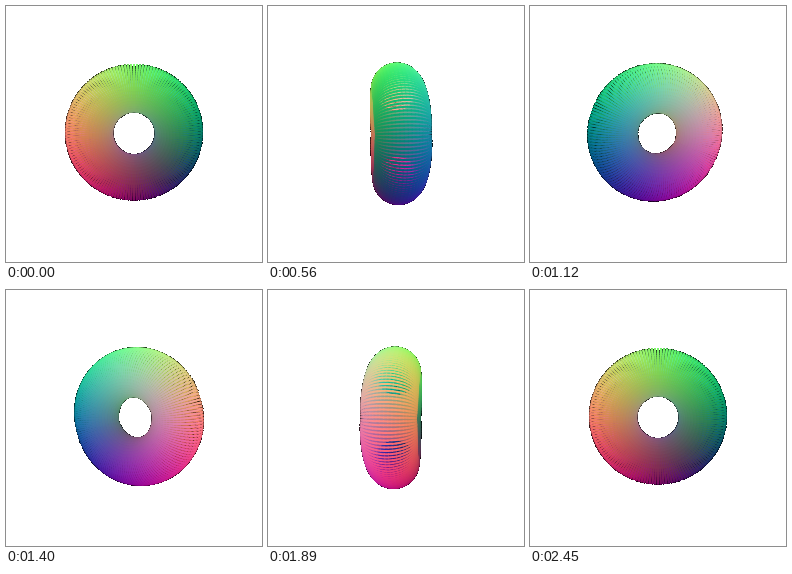
An HTML page with a canvas for the animation above (2.52 s loop, 256x256 px).

```html
<!DOCTYPE html>
<html lang="en">
<head>
<meta charset="utf-8">
<title>Rotating torus</title>
<style>
html, body { margin: 0; width: 100%; height: 100%; overflow: hidden; background: #fff; }
canvas { display: block; width: 256px; height: 256px; }
</style>
</head>
<body>
<canvas id="stage" width="256" height="256"></canvas>
<script>
const SIZE = 256, STEP = 70, STEPS = 36, TAU = Math.PI * 2;
const RING = 44.5, TUBE = 23.1, CAMERA = 250, PITCH = 0.125;
const LOOPS = 148, PARTS = 48, OVERLAP = 0.12, MIN_ALPHA = 40;

const ctx = document.getElementById('stage').getContext('2d', { willReadFrequently: true });
ctx.lineWidth = 2;

function torusPoint(loop, part) {
  const v = loop / LOOPS * TAU, u = part / PARTS * TAU;
  const radius = RING + TUBE * Math.cos(u);
  return [radius * Math.cos(v), radius * Math.sin(v), TUBE * Math.sin(u)];
}

// Each colour channel follows one body axis.
function colorAt([x, y, z]) {
  const channel = p => Math.round(127.5 + 127.5 * p / (RING + TUBE));
  return `rgb(${channel(-x)},${channel(y)},${channel(-z)})`;
}

const segments = [];
for (let loop = 0; loop < LOOPS; loop++) {
  for (let part = 0; part < PARTS; part++) {
    const middle = torusPoint(loop, part + 0.5);
    segments.push({
      from: torusPoint(loop, part - OVERLAP),
      to: torusPoint(loop, part + 1 + OVERLAP),
      middle, color: colorAt(middle), depth: 0
    });
  }
}

const pitchCos = Math.cos(PITCH), pitchSin = Math.sin(PITCH);

function draw(angle) {
  const c = Math.cos(angle), s = Math.sin(angle);
  // Turn about the upright axis, then tip the top towards the viewer.
  const turn = ([x, y, z]) => {
    const near = x * s + z * c;
    return [x * c - z * s, y * pitchCos - near * pitchSin, near * pitchCos + y * pitchSin];
  };
  const project = p => {
    const [x, y, z] = turn(p), scale = CAMERA / (CAMERA - z);
    return [128 + x * scale, 127.75 - y * scale];
  };

  for (const seg of segments) seg.depth = turn(seg.middle)[2];
  segments.sort((a, b) => a.depth - b.depth);

  ctx.clearRect(0, 0, SIZE, SIZE);
  for (const { from, to, color } of segments) {
    ctx.strokeStyle = color;
    ctx.beginPath();
    ctx.moveTo(...project(from));
    ctx.lineTo(...project(to));
    ctx.stroke();
  }
  flatten();
}

// Soft edges fade to black; nearly empty pixels become white.
function flatten() {
  const image = ctx.getImageData(0, 0, SIZE, SIZE), d = image.data;
  for (let i = 0; i < d.length; i += 4) {
    const alpha = d[i + 3];
    for (let k = i; k < i + 3; k++) d[k] = alpha < MIN_ALPHA ? 255 : d[k] * alpha / 255;
    d[i + 3] = 255;
  }
  ctx.putImageData(image, 0, 0);
}

let shown = -1;
const start = performance.now();
function tick() {
  const step = Math.floor((performance.now() - start) / STEP) % STEPS;
  if (step !== shown) {
    shown = step;
    draw(step / (STEPS - 1) * TAU);
  }
  requestAnimationFrame(tick);
}
tick();
</script>
</body>
</html>
```
